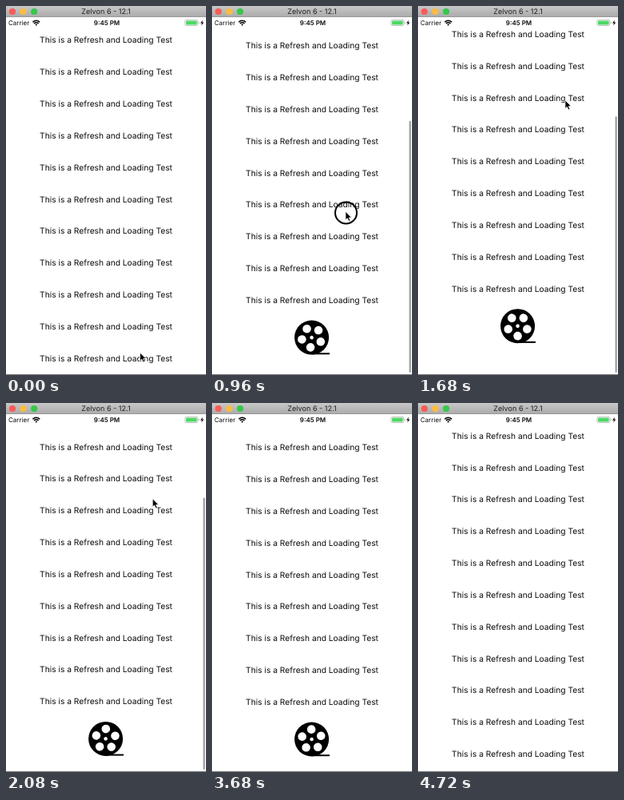
Recreate the animation shown at these times as an HTML page. Size 250 by 462 pixels, loop 4.8 s.

```html
<!DOCTYPE html>
<html lang="en">
<head>
<meta charset="utf-8">
<title>Refresh and loading</title>
<style>
  html, body { margin: 0; width: 100%; height: 100%; overflow: hidden; background: #fff; }
  svg { display: block; width: 250px; height: 462px; }
  text { font-family: Inter, Roboto, sans-serif; text-rendering: geometricPrecision; fill: #0a0a0a; }
  .row { font-size: 10.23px; text-anchor: middle; }
  .title { font-size: 9.1px; text-anchor: middle; fill: #222; }
  .status { font-size: 8px; }
</style>
</head>
<body>
<svg viewBox="0 0 250 462">
  <defs>
    <linearGradient id="chrome" x2="0" y2="1">
      <stop offset="0" stop-color="#c8c8c8"/>
      <stop offset="1" stop-color="#aaa"/>
    </linearGradient>
  </defs>
  <rect width="250" height="462" fill="#fff"/>

  <g id="list">
    <g id="reel" transform="translate(124.6 46.3)">
      <circle r="21.5"/>
      <path d="M0 20.2H22.4" stroke="#000" stroke-width="2"/>
      <g id="holes" fill="#fff"><circle r="2.3"/></g>
    </g>
  </g>

  <rect id="bar" x="246.5" y="0" width="2.2" rx="1.1" fill="#000"/>

  <g id="statusBar">
    <rect y="14" width="250" height="13.5" fill="#fff"/>
    <text class="status" x="3" y="24">Carrier</text>
    <g fill="none" stroke="#000" stroke-width="1.5">
      <path d="M33.4 20.2a6.2 6.2 0 0 1 8.8 0M35 22a4 4 0 0 1 5.6 0"/>
      <path d="M36.4 23.2a2 2 0 0 1 2.8 0L37.8 24.8Z" fill="#000" stroke="none"/>
    </g>
    <text class="status" x="126" y="24" text-anchor="middle" font-weight="600">9:45 PM</text>
    <rect x="223.8" y="17.3" width="16" height="7.2" rx="1.8" fill="none" stroke="#999" stroke-width=".6"/>
    <rect x="225" y="18.4" width="13.6" height="5" rx=".9" fill="#4cd964"/>
    <path d="M240.7 19.7v2.4q1-.4 1-1.2t-1-1.2" fill="#999"/>
    <path d="M246 17.6l-3 3.9h2l-.9 3 3.2-4.1h-2.1z"/>
  </g>

  <rect width="250" height="14" fill="url(#chrome)"/>
  <path d="M0 13.5H250" stroke="#999"/>
  <circle cx="8" cy="7" r="4.1" fill="#fc5b57"/>
  <circle cx="21.6" cy="7" r="4.1" fill="#fdbc40"/>
  <circle cx="35.2" cy="7" r="4.1" fill="#34c84a"/>
  <text class="title" x="125" y="10.4">Zelvon 6 - 12.1</text>
  <path d="M0 461.5H250" stroke="#777"/>

  <g id="pointer">
    <circle id="touch" r="13.5" fill="none" stroke="#000" stroke-width="2"/>
    <path transform="translate(-.6 -1.6)" d="M0 0V10.6L2.4 8.4L4.1 12.2L6 11.4L4.4 7.7H7.6Z" stroke="#fff" stroke-width=".8"/>
  </g>
</svg>
<script>
const LOOP = 4800, STEP = 80;
const ROWS = 12, ROW_H = 39.85, VIEW_H = 434;
const REST = 441.6, LOADING = 374.7;      // y of the last row
const PRESS = 208, RELEASE = 1520, RETURN = 4360, RETURN_MS = 400;
const TOUCH_Y = 418, BAR_END = 459;
const TURN_MS = 960;

// time, x, y of the pointer tip
const PATH = [
  [0, 168, 435.5], [128, 168, 435.5], [640, 158, 326.3], [1280, 177, 191.5],
  [1680, 184.5, 119.5], [2240, 183.5, 122], [2640, 180.6, 133.3], [2880, 180.6, 133.3], [3360, 190, -14]
];

const $ = id => document.getElementById(id);
const clamp = v => Math.min(1, Math.max(0, v));

function add(parent, tag, attrs) {
  const el = document.createElementNS('http://www.w3.org/2000/svg', tag);
  for (const key in attrs) el.setAttribute(key, attrs[key]);
  return parent.appendChild(el);
}

for (let i = 0; i < ROWS; i++) {
  add($('list'), 'text', { class: 'row', x: 125, y: 3.2 - i * ROW_H })
    .textContent = 'This is a Refresh and Loading Test';
}
for (let i = 0; i < 5; i++) {
  const a = (i * 72 - 90) * Math.PI / 180;
  add($('holes'), 'circle', { cx: 12.4 * Math.cos(a), cy: 12.4 * Math.sin(a), r: 5.3 });
}

function pointerAt(t) {
  const i = PATH.findIndex(p => p[0] > t);
  if (i < 0) return PATH[PATH.length - 1].slice(1);
  const [t0, x0, y0] = PATH[i - 1], [t1, x1, y1] = PATH[i];
  const k = (t - t0) / (t1 - t0);
  return [x0 + (x1 - x0) * k, y0 + (y1 - y0) * k];
}

// Rubber-band resistance of an overscrolled list
function pulled(t) {
  const drag = Math.max(0, TOUCH_Y - pointerAt(t)[1]);
  return VIEW_H * (1 - 1 / (drag * 0.55 / VIEW_H + 1));
}

function lastRowAt(t) {
  if (t < PRESS) return REST;
  if (t < RELEASE) return REST - pulled(t);
  if (t < RETURN) {
    const s = 0.0112 * (t - RELEASE);
    return LOADING + (REST - pulled(RELEASE) - LOADING) * (1 + s) * Math.exp(-s);
  }
  const k = clamp((t - RETURN) / RETURN_MS);
  return LOADING + (REST - LOADING) * (1 - Math.cos(Math.PI * k)) / 2;
}

// One turn per cycle, slow at both ends and quick in the middle
function reelAngle(t) {
  const k = (t - 560) / TURN_MS;
  return 238 + 360 * k + 30 * Math.sin(2 * Math.PI * k);
}

function draw(t) {
  const y = lastRowAt(t), [px, py] = pointerAt(t);
  $('list').setAttribute('transform', `translate(0 ${y})`);
  $('holes').setAttribute('transform', `rotate(${reelAngle(t)})`);

  const len = t < RELEASE ? 388 - (REST - y) : 341 - Math.max(0, LOADING - y);
  $('bar').setAttribute('y', BAR_END - len);
  $('bar').setAttribute('height', len);
  $('bar').setAttribute('opacity', t < PRESS ? 0 : 0.4 * clamp((2600 - t) / 260));

  $('pointer').setAttribute('transform', `translate(${px} ${py})`);
  $('pointer').setAttribute('visibility', t < 3360 ? 'visible' : 'hidden');
  $('touch').setAttribute('opacity', t >= PRESS && t < RELEASE ? 1 : 0);
}

const start = performance.now();
function tick() {
  const t = (performance.now() - start) % LOOP;
  draw(Math.floor(t / STEP) * STEP);
  requestAnimationFrame(tick);
}
tick();
</script>
</body>
</html>
```
